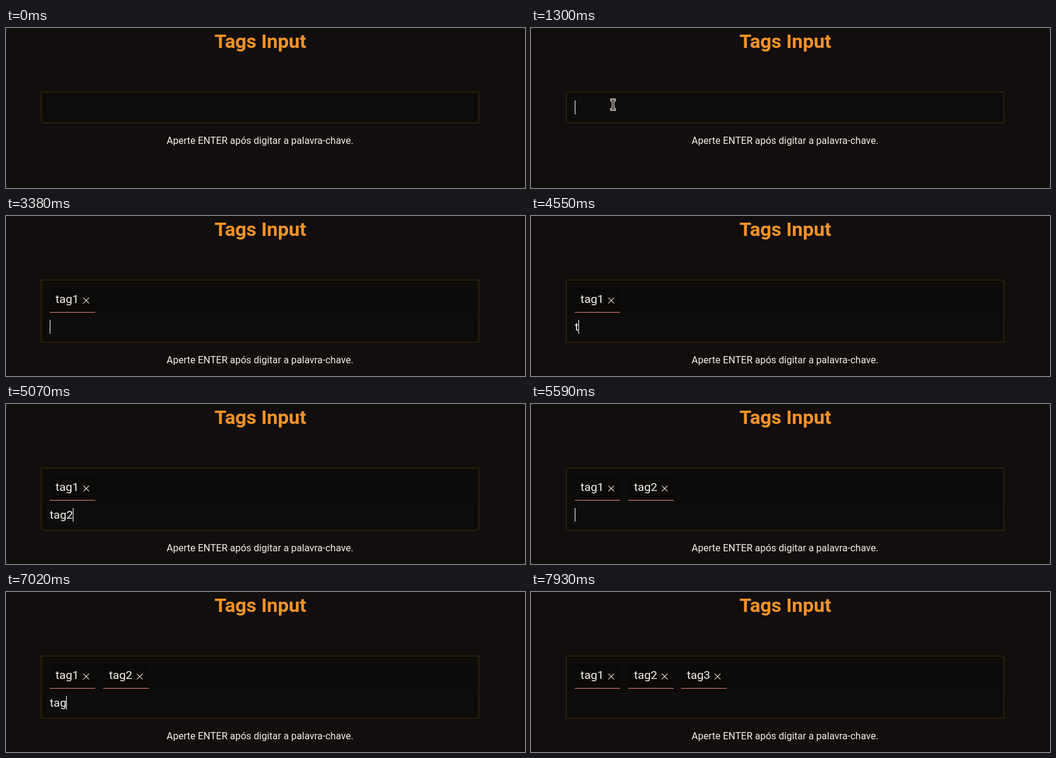
An HTML page that plays this animation: 854 px wide and 265 px high, repeating every 8 s.

```html
<!DOCTYPE html>
<html lang="pt-BR">
<head>
<meta charset="utf-8">
<title>Tags Input</title>
<style>
  html, body { margin: 0; width: 100%; height: 100%; overflow: hidden; background: #120e0d; }
  svg { display: block; font-family: Roboto, sans-serif; }
</style>
</head>
<body>
<svg width="854" height="265" viewBox="0 0 854 265">
  <defs>
    <filter id="soft" x="-5%" y="-20%" width="110%" height="140%"><feGaussianBlur stdDeviation="1.5"/></filter>
    <g id="tag">
      <rect y="120" width="75" height="39" fill="#0b0a08"/>
      <rect y="159" width="75" height="1" fill="#e5847a"/>
      <path d="M55.3 135.3l9.4 9.4m0-9.4l-9.4 9.4" stroke="#eee0cb" stroke-width="1.2"/>
    </g>
  </defs>
  <rect width="854" height="265" fill="#120e0d"/>
  <text x="418.5" y="33" font-size="32" font-weight="700" fill="#f39328" text-anchor="middle">Tags Input</text>
  <rect id="box" x="58" y="106" width="720" height="51" rx="2" fill="#0e0c0a" stroke="#2b1f09" stroke-width="2"/>
  <g id="tags"></g>
  <g id="field">
    <rect x="66" y="114" width="705" height="35" fill="#0b0a08" filter="url(#soft)"/>
    <text id="typed" x="72" y="138" font-size="19.2" fill="#f4f0ea"></text>
    <rect id="caret" y="120" width="1" height="23" fill="#fff"/>
    <text x="418" y="192" font-size="16" fill="#f4f0ea" text-anchor="middle">Aperte ENTER após digitar a palavra-chave.</text>
  </g>
  <g id="pointer">
    <path id="beam" d="M-4-9.5H-1L0-8.5 1-9.5H4V-6.5H1.5V6.5H4V9.5H1L0 8.5-1 9.5H-4V6.5H-1.5V-6.5H-4Z" fill="#15120f" stroke="#ddd6ca" stroke-width="1.3"/>
    <path id="arrow" d="M0 0V16L4 12.5 6.5 18.5 9 17.5 6.5 11.5H11.5Z" fill="#15120f" stroke="#ddd6ca" stroke-width="1.2"/>
  </g>
</svg>
<script>
const LOOP = 8000, STEP = 130, ROW = 52;
const $ = id => document.getElementById(id);

// start time, number of tags, typed text, caret visible
const states = [
  [0, 0, '', 0], [1300, 0, '', 1], [1820, 0, '', 0],
  [2080, 0, 't', 1], [2340, 0, 'ta', 1], [2470, 0, 'tag', 1], [2860, 0, 'tag1', 1],
  [3380, 1, '', 1], [3510, 1, '', 0], [4160, 1, '', 1],
  [4550, 1, 't', 1], [4680, 1, 'ta', 1], [4810, 1, 'tag', 1], [5070, 1, 'tag2', 1],
  [5590, 2, '', 1], [5720, 2, '', 0], [6240, 2, '', 1],
  [6630, 2, 't', 1], [6760, 2, 'ta', 1], [7020, 2, 'tag', 1], [7280, 2, 'tag3', 1],
  [7800, 3, '', 1], [7930, 3, '', 0]
];
const mouse = { show: 520, rest: 1170, hide: 3120, from: [196, 215], to: [135, 127] };

$('tags').innerHTML = [1, 2, 3].map(n => `<g transform="translate(${72 + Math.round((n - 1) * 87.6)})">
  <use href="#tag"/><text x="9.6" y="144" font-size="19.2" fill="#f4f0ea">tag${n}</text></g>`).join('');

const show = (el, on) => el.setAttribute('visibility', on ? 'inherit' : 'hidden');

function drawPointer(t) {
  const { show: start, rest, hide, from, to } = mouse;
  const p = Math.min(1, Math.max(0, (t - start) / (rest - start)));
  const ease = 1 - (1 - p) ** 2;
  const [x, y] = from.map((v, i) => v + (to[i] - v) * ease);
  const inside = y < 157;
  show($('pointer'), t >= start && t < hide);
  show($('beam'), inside);
  show($('arrow'), !inside);
  $('pointer').setAttribute('transform', `translate(${x} ${y})`);
}

function draw(time) {
  const [, count, text, caret] = states.findLast(s => s[0] <= time);
  const shift = count ? ROW : 0;
  $('box').setAttribute('height', 51 + shift);
  $('field').setAttribute('transform', `translate(0 ${shift})`);
  [...$('tags').children].forEach((g, i) => show(g, i < count));
  $('typed').textContent = text;
  $('caret').setAttribute('x', Math.floor(72 + (text ? $('typed').getComputedTextLength() : 0)));
  show($('caret'), caret);
  drawPointer(Math.floor(time / STEP) * STEP);
}

const begin = performance.now();
function tick() {
  draw((performance.now() - begin) % LOOP);
  requestAnimationFrame(tick);
}
tick();
</script>
</body>
</html>
```
